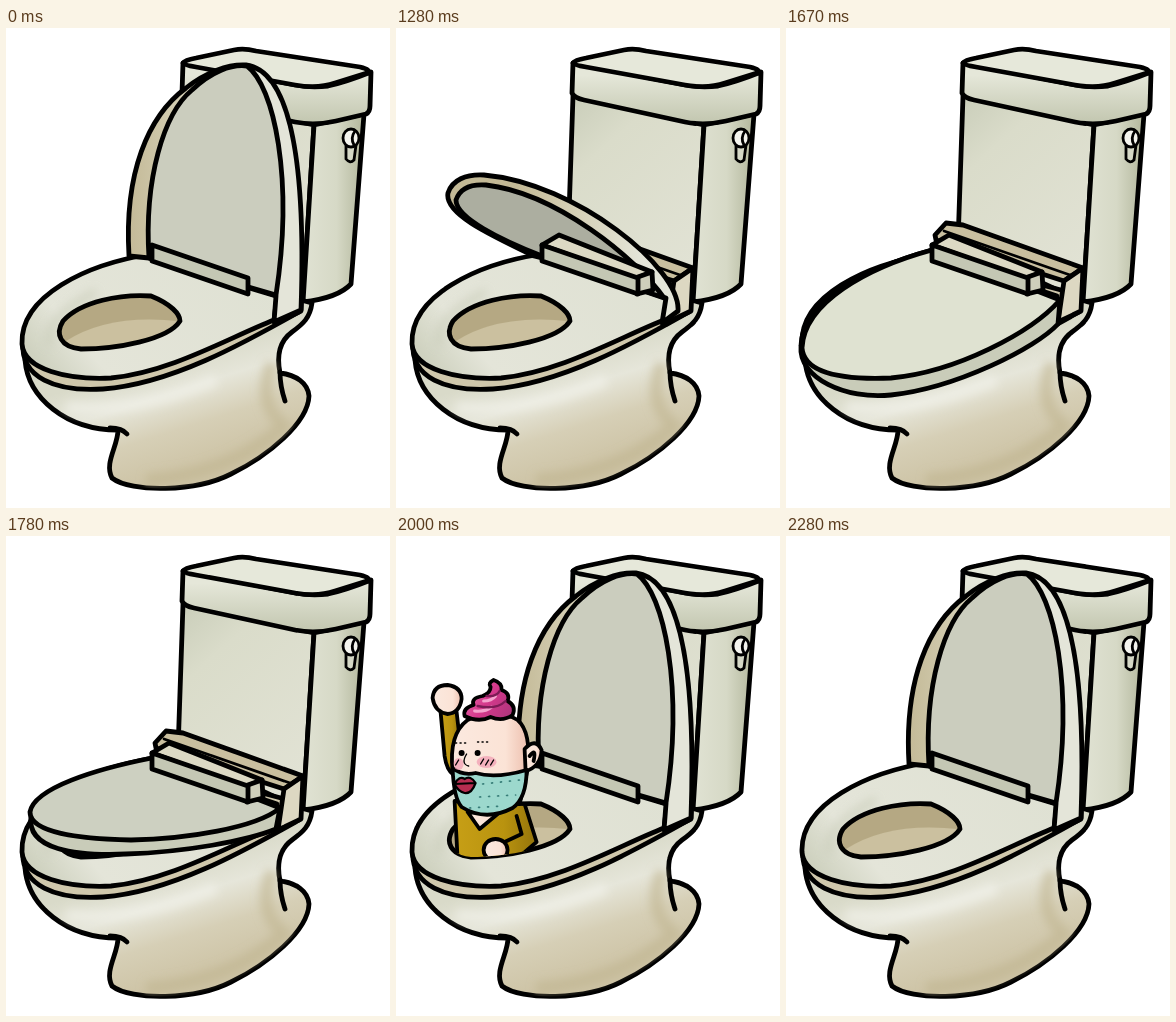
Recreate the animation shown at these times as an HTML page. Size 384 by 480 pixels, loop 2560 ms.

```html
<!DOCTYPE html>
<html lang="en">
<head>
<meta charset="utf-8">
<title>Surprise in the bowl</title>
<style>
  html, body { margin: 0; width: 100%; height: 100%; overflow: hidden; background: #fff; }
  svg { display: block; width: 100vw; height: 100vh; }
  .ink { stroke: #000; stroke-width: 4.8; stroke-linejoin: round; stroke-linecap: round; }
  .thin { stroke: #000; stroke-width: 2.8; stroke-linejoin: round; stroke-linecap: round; }
  #man { stroke-width: 3.8; }
  .line { fill: none; }
</style>
</head>
<body>
<svg viewBox="0 0 384 480" preserveAspectRatio="none">
  <defs>
    <linearGradient id="front" x1="0" x2="0.6" y1="0" y2="1">
      <stop offset="0" stop-color="#c9cdb9"/><stop offset=".3" stop-color="#dadcca"/><stop offset="1" stop-color="#e1e2d4"/>
    </linearGradient>
    <linearGradient id="flank">
      <stop offset="0" stop-color="#e0e2d3"/><stop offset=".55" stop-color="#d6d9c6"/><stop offset="1" stop-color="#b3b79c"/>
    </linearGradient>
    <linearGradient id="band" x1="0" x2="0" y1="0" y2="1">
      <stop offset=".2" stop-color="#e5e7d9"/><stop offset="1" stop-color="#c2c6af"/>
    </linearGradient>
    <linearGradient id="bowl" gradientUnits="userSpaceOnUse" x1="130" y1="340" x2="165" y2="450">
      <stop offset="0" stop-color="#d9dac9"/><stop offset=".3" stop-color="#e6e6da"/>
      <stop offset=".62" stop-color="#d6cfb6"/><stop offset="1" stop-color="#cdc3a5"/>
    </linearGradient>
    <linearGradient id="seat" x1="0" x2="1" y1=".7" y2=".3">
      <stop offset="0" stop-color="#cfd2c0"/><stop offset=".2" stop-color="#e4e5d9"/><stop offset="1" stop-color="#dfe1d3"/>
    </linearGradient>
    <linearGradient id="rim" gradientUnits="userSpaceOnUse" x1="120" y1="0" x2="290" y2="0">
      <stop offset="0" stop-color="#c3b996"/><stop offset=".3" stop-color="#d3cdb2"/><stop offset=".75" stop-color="#e4e5d9"/>
    </linearGradient>
    <linearGradient id="hair" x1="0" x2="1" y1=".2" y2=".7">
      <stop offset="0" stop-color="#e768ab"/><stop offset=".5" stop-color="#d5398c"/><stop offset="1" stop-color="#b0357c"/>
    </linearGradient>
    <linearGradient id="skin">
      <stop offset="0" stop-color="#fbe9df"/><stop offset=".7" stop-color="#fbe3d6"/><stop offset="1" stop-color="#edbfae"/>
    </linearGradient>
    <linearGradient id="wool">
      <stop offset="0" stop-color="#c79f16"/><stop offset=".6" stop-color="#b9930f"/><stop offset="1" stop-color="#94740b"/>
    </linearGradient>
    <filter id="soft" x="-30%" y="-30%" width="160%" height="160%"><feGaussianBlur stdDeviation="5"/></filter>
    <clipPath id="hollow"><path d="M57 293C75 273 115 266 145 268C165 276 174 286 174 293C162 312 110 321 75 321C54 319 49 306 57 293Z"/></clipPath>
    <clipPath id="mouth"><path d="M0-40H384V293H174C162 312 110 321 75 321C54 319 49 306 57 293H0Z"/></clipPath>
    <clipPath id="hull"><path d="M19 335C22 370 60 402 112 402C112 418 98 435 106 450C125 465 190 464 225 446C262 428 302 395 303 368C302 355 290 347 274 345L277 316L290 285Z"/></clipPath>
  </defs>

  <g id="tank" class="ink">
    <path fill="url(#front)" d="M177 68L172 215L297 274L308 97Z"/>
    <path fill="url(#flank)" d="M308 97L297 274Q332 270 345 256L358 86Z"/>
    <path fill="url(#band)" d="M177 35L176 65Q178 70 188 72L289 94Q309 98 330 93L360 86Q364 84 364 78L365 44Q340 54 322 58Q305 60 289 57Z"/>
    <path fill="#e6e8da" d="M177 35Q179 32 190 30L228 22Q238 20 250 23L354 39Q366 42 361 45L329 55Q312 61 289 57L190 39Q178 37 177 35Z"/>
    <path fill="#d5d8c6" class="thin" d="M340 118L340 131Q344 136 348 132L350 117Z"/>
    <ellipse fill="#f4f4ee" class="thin" cx="345" cy="110" rx="8" ry="9"/>
    <path class="thin line" d="M349 103Q344 110 348 117"/>
  </g>

  <path class="ink" fill="url(#bowl)" d="M19 332C22 370 60 402 112 402C112 418 98 435 106 450C125 465 190 464 225 446C262 428 302 395 303 368C302 355 290 347 274 345C270 325 275 312 286 304C297 296 304 290 306 275L280 268Z"/>
  <g clip-path="url(#hull)" filter="url(#soft)">
    <path fill="none" stroke="#c0b48f" stroke-width="12" opacity=".6" d="M266 335Q250 375 278 398Q220 448 140 452"/>
    <path fill="none" stroke="#f4f4ed" stroke-width="12" opacity=".6" d="M60 379Q130 386 210 352"/>
  </g>
  <path class="ink line" d="M274 344Q274 358 279 373M104 400Q116 400 121 406"/>

  <path class="ink" fill="#d0c8ac" d="M17 314C14 350 50 364 97 361C165 356 238 315 293 284L275 262L146 228Z"/>
  <path class="ink" fill="url(#seat)" d="M146 226C80 236 14 268 16 316C18 342 62 352 105 350C165 344 222 310 268 292L271 268Z"/>
  <path filter="url(#soft)" fill="none" stroke="#c9ccb9" stroke-width="8" opacity=".65" d="M44 318Q36 292 90 264"/>
  <g clip-path="url(#hollow)">
    <path fill="#b5a883" d="M40 255H190V330H40Z"/>
    <path fill="#cbc09f" d="M60 313Q105 284 180 294V330H50Z"/>
  </g>
  <path class="ink line" d="M57 293C75 273 115 266 145 268C165 276 174 286 174 293C162 312 110 321 75 321C54 319 49 306 57 293Z"/>

  <g class="ink">
    <path fill="#c9bf9f" d="M149 207L160 195L177 197L297 240L278 253L150 212Z"/>
    <path fill="#ddd8c2" d="M278 253L297 240L295 283L272 294Z"/>
    <path class="thin line" d="M158 203L284 247"/>
  </g>

  <g id="open">
    <path id="shell" class="ink" fill="url(#rim)"/>
    <path id="panel" class="ink"/>
  </g>
  <g id="shut">
    <path id="edge" class="ink" fill="#c9ccb9"/>
    <path id="cover" class="ink"/>
  </g>
  <g class="ink">
    <g id="cap">
      <path fill="#dcd9c4" d="M146 217L163 207L256 244L239 251Z"/>
      <path fill="#cfcfbb" d="M239 250L256 244L257 262L241 266Z"/>
    </g>
    <path fill="#c4c7b4" d="M146 217L242 250L242 266L146 233Z"/>
  </g>

  <g clip-path="url(#mouth)">
    <g id="man" class="thin">
      <path fill="url(#skin)" d="M66 226L68 246L62 260Q67 266 75 261L78 246L78 228Z"/>
      <path fill="url(#skin)" d="M87 228L89 246L88 261Q95 267 102 261L98 246L99 228Z"/>
      <path fill="#2f4b99" d="M48 185L54 224Q62 232 76 229L78 212L82 231Q92 233 100 229L103 185Z"/>
      <path fill="url(#wool)" d="M37 125L40 183Q70 194 104 188L105 178L119 166L107 128Z"/>
      <path fill="url(#wool)" d="M23 36L27 80Q29 94 36 99L42 62L39 36Z"/>
      <path fill="url(#skin)" d="M50 136L62 153L80 138Z"/>
      <path class="line" d="M99 140L104 158L87 166M105 178L88 184"/>
      <ellipse fill="url(#skin)" cx="78" cy="174" rx="12" ry="11"/>
      <path fill="url(#skin)" d="M15 22Q16 9 30 9Q44 11 44 23Q42 37 30 38Q17 36 15 22Z"/>
      <path fill="url(#skin)" d="M35 95Q31 58 50 44Q77 30 100 44Q114 56 110 94L102 128H45Z"/>
      <path fill="url(#skin)" d="M107 73Q118 61 124 74Q123 91 108 95Z"/>
      <path class="line" d="M112 80Q119 71 116 85"/>
      <path fill="#9cd8cd" d="M35 92Q45 100 58 97Q78 103 109 94Q109 122 95 132Q68 146 44 131Q36 122 35 92Z"/>
      <g stroke="none" fill="#f2a0b4" opacity=".75"><ellipse cx="69" cy="86" rx="10" ry="6"/><ellipse cx="41" cy="88" rx="5" ry="6"/></g>
      <path class="line" stroke-dasharray="1 3.5" style="stroke-width:1.6" d="M38 67H48M60 66H73"/>
      <path class="line" style="stroke-width:1.4" d="M63 88L66 83M68 89L71 84M73 89L76 84M38 89L41 84M49 78Q43 88 51 90"/>
      <g stroke="none"><circle cx="44" cy="77" r="3"/><circle cx="60" cy="77" r="3"/></g>
      <path fill="#b62d50" style="stroke-width:2.2" d="M37 108Q42 99 47 103Q53 99 58 107Q54 118 47 117Q40 115 37 108L58 107"/>
      <path class="line" stroke-dasharray="1 8" style="stroke:#377d78;stroke-width:1.7" d="M65 108L102 104M62 121L98 119M52 132L86 130"/>
      <path fill="url(#hair)" d="M47 40Q45 32 56 29Q53 22 65 20Q73 17 73 11Q70 7 76 4Q85 7 84 14Q93 17 90 25Q99 30 95 39Q85 46 73 41Q61 47 47 40Z"/>
      <path class="line" style="stroke:#f4a3cd;stroke-width:3" d="M57 35Q68 36 74 31M66 25Q74 25 78 20"/>
      <path class="line" style="stroke:#7c1b55;stroke-width:2.4" d="M60 30Q79 34 88 25M69 20Q79 21 82 15"/>
    </g>
  </g>
</svg>
<script>
  const el = id => document.getElementById(id);

  // Lid outlines and face tones: shut, ajar | half way, leaning, nearly up, up
  const shutPoses = [
    { edge: "M146 222C80 240 15 275 15 318C12 350 60 372 105 367C170 360 250 320 272 296L274 272Z",
      cover: "M146 222C80 240 18 275 16 320C18 345 55 352 105 350C170 344 245 305 274 272Z",
      tone: "rgb(223,226,209)" },
    { edge: "M146 222C90 233 28 255 25 280C20 314 70 320 120 318C180 316 240 305 270 293L274 272Z",
      cover: "M146 222C90 233 28 252 24 276C24 296 70 303 125 304C180 303 250 292 274 272Z",
      tone: "rgb(205,208,193)" }
  ];
  const openPoses = [
    { shell: "M138 228C90 205 48 185 52 165C56 152 70 146 88 147C180 155 285 240 282 283L266 295L270 270L146 230Z",
      panel: "M146 228C105 212 60 190 60 172C64 160 76 156 90 157C160 165 240 230 268 270Z",
      tone: "rgb(172,174,160)" },
    { shell: "M126 230C104 195 96 125 114 88C125 80 140 74 156 74C225 66 280 190 284 264L266 295L270 268L143 230Z",
      panel: "M143 226C112 190 106 135 120 92C130 85 148 81 168 82C205 85 262 215 270 268Z",
      tone: "rgb(179,181,167)" },
    { shell: "M122 228C108 170 130 95 162 66C178 50 192 43 204 43C245 48 288 150 287 283L266 295L270 268L143 230Z",
      panel: "M143 230C118 170 142 88 168 63C180 50 192 43 204 43C235 65 275 180 270 268Z",
      tone: "rgb(198,201,187)" },
    { shell: "M123 228C118 145 142 88 180 60C200 44 222 36 240 37C278 42 301 110 295 282L268 294L270 268L143 230Z",
      panel: "M143 230C138 150 158 85 186 62C205 44 225 36 241 38C268 58 288 150 270 267Z",
      tone: "rgb(203,205,190)" }
  ];

  // time, lid (0 shut .. 5 up)
  const steps = [
    [0, 5], [1170, 4], [1220, 3.2], [1280, 2], [1330, 1], [1390, 0],
    [1440, .35], [1500, 0], [1610, .25], [1670, 0],
    [1720, .45], [1780, 1], [1830, 2], [1890, 3], [1940, 4],
    [2000, 5], [2050, 5], [2110, 5], [2160, 5], [2220, 5], [2280, 5]
  ];
  const loop = 2560, launch = 1890, gone = 2280;

  function blend(a, b, k) {
    const to = b.match(/-?[\d.]+/g);
    let i = 0;
    return a.replace(/-?[\d.]+/g, n => +n + (to[i++] - n) * k);
  }

  function pose(list, at, outline, face) {
    const i = Math.min(Math.floor(at), list.length - 2);
    const mix = key => blend(list[i][key], list[i + 1][key], at - i);
    el(outline).setAttribute("d", mix(outline));
    el(face).setAttribute("d", mix(face));
    el(face).setAttribute("fill", mix("tone"));
  }

  const show = (id, on) => { el(id).style.display = on ? "" : "none"; };

  // The man shoots out of the bowl and leaves over the top edge.
  function fly(time) {
    const k = (time - 2110) / 55;
    const x = k * (.4 * k - 10), y = -k * (2.5 * k + 75);
    el("man").setAttribute("transform", `translate(${x} ${y})`);
  }

  let last;
  function draw(now) {
    const t = now % loop;
    const step = steps.findLast(s => s[0] <= t);
    if (step === last) return;
    last = step;
    const [time, lid] = step;
    const up = lid >= 2;
    if (up) pose(openPoses, lid - 2, "shell", "panel");
    else pose(shutPoses, lid, "edge", "cover");
    show("open", up);
    show("shut", !up);
    show("cap", lid < 2.5);
    show("man", time >= launch && time < gone);
    fly(time);
  }

  const start = performance.now();
  function tick() {
    draw(performance.now() - start);
    requestAnimationFrame(tick);
  }
  tick();
</script>
</body>
</html>
```
